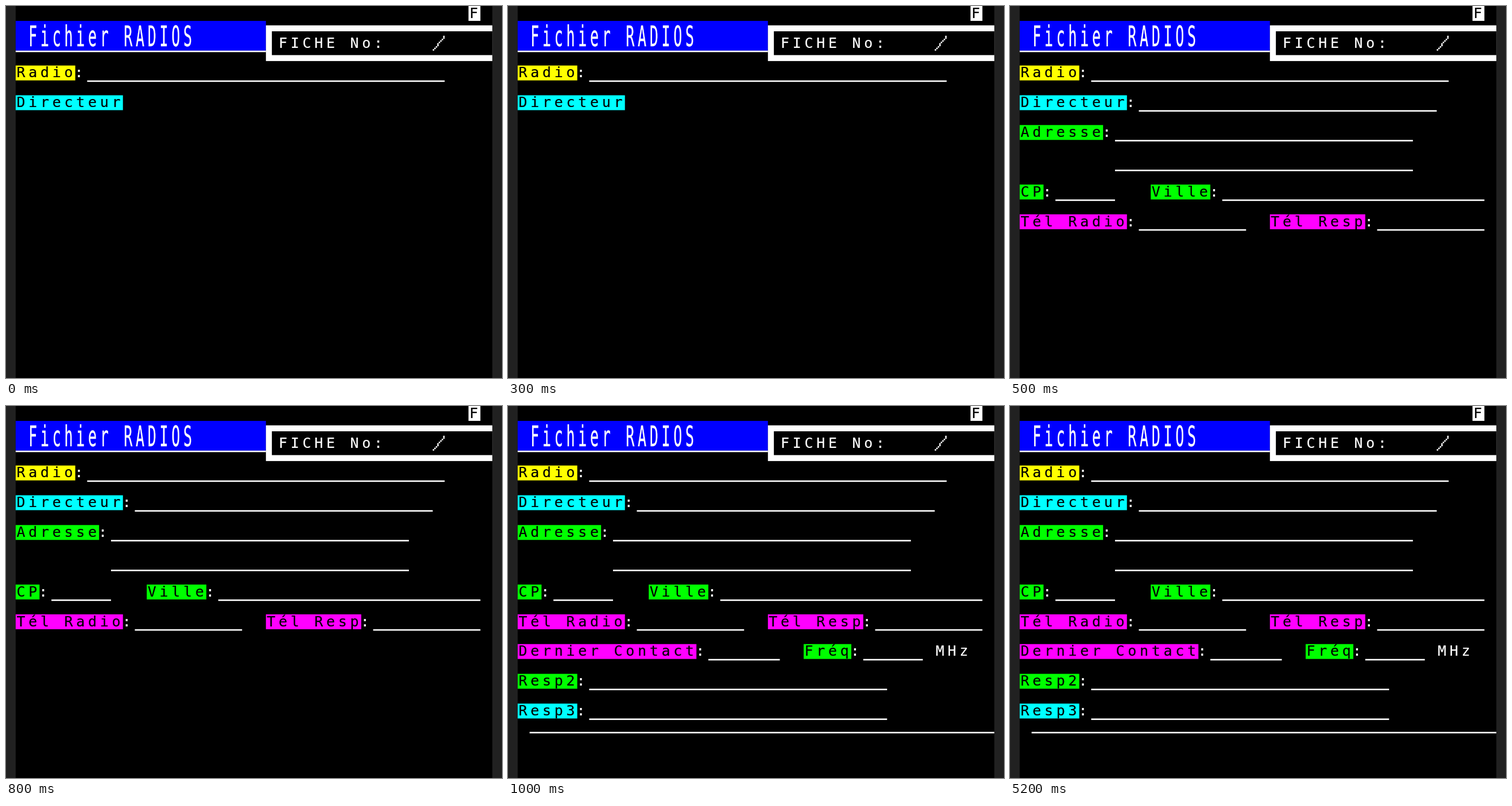
Animation of 864x648 px, one loop 8 s. Source, as an HTML page:

```html
<!DOCTYPE html>
<html lang="fr">
<head>
<meta charset="utf-8">
<style>
html, body { margin: 0; height: 100%; overflow: hidden; background: #212121; }
svg { display: block; width: 864px; height: 648px; }
text { font: 9.6px "DejaVu Sans Mono", monospace; stroke-width: .08; white-space: pre; }
</style>
</head>
<body>
<!-- 40 x 25 character cells of 8 x 10 dots -->
<svg viewBox="-6.5 0 333 250" preserveAspectRatio="none"></svg>
<script>
const NS = 'http://www.w3.org/2000/svg';
const YELLOW = '#ff0', CYAN = '#0ff', GREEN = '#0f0', MAGENTA = '#f0f', WHITE = '#fff', BLACK = '#000';
const svg = document.querySelector('svg');
let layer;

function add(name, attrs, parent = layer) {
  const el = document.createElementNS(NS, name);
  for (const key in attrs) el.setAttribute(key, attrs[key]);
  return parent.appendChild(el);
}

function rect(x, y, width, height, fill = WHITE) {
  add('rect', { x, y, width, height, fill });
}

// One glyph per cell; x and baseline are in dots
function text(str, x, baseline, color = WHITE, tall = 1) {
  const el = add('text', {
    transform: `translate(${x + 0.6} ${baseline}) scale(1 ${tall})`,
    x: [...str].map((_, i) => i * 8).join(' '),
    fill: color, stroke: color
  });
  el.textContent = str;
}

function label(str, col, row, color) {
  rect(col * 8, row * 10, str.length * 8, 10, color);
  text(str, col * 8, row * 10 + 8, BLACK);
}

function line(from, to, row) {
  rect(from * 8, row * 10 + 10, (to - from) * 8, 1);
}

function colon(col, row) {
  text(':', col * 8 - 1, row * 10 + 8);
}

function field(str, col, row, color, end) {
  const stop = col + str.length;
  label(str, col, row, color);
  colon(stop, row);
  line(stop + 1, end, row);
}

function stage(start, draw) {
  layer = add('g', {}, svg);
  draw();
  return { start, el: layer };
}

const stages = [
  stage(0, () => {
    rect(0, 0, 320, 250, BLACK);
    label('F', 38, 0, WHITE);
    rect(0, 10, 168, 20, '#00f');
    rect(0, 30, 168, 1);
    text('Fichier RADIOS', 8, 27, WHITE, 2);
    rect(168, 13, 152, 24);
    rect(172, 17, 148, 16, BLACK);
    text('FICHE No:', 176, 28);
    for (let i = 0; i < 10; i++) rect(287 - Math.floor(i * 0.8), 20 + i, 1, 1);
    field('Radio', 0, 4, YELLOW, 36);
    label('Directeur', 0, 6, CYAN);
  }),
  stage(500, () => {
    colon(9, 6);
    line(10, 35, 6);
    field('Adresse', 0, 8, GREEN, 33);
    line(8, 33, 10);
    field('CP', 0, 12, GREEN, 8);
    field('Ville', 11, 12, GREEN, 39);
    field('Tél Radio', 0, 14, MAGENTA, 19);
    field('Tél Resp', 21, 14, MAGENTA, 39);
  }),
  stage(1000, () => {
    field('Dernier Contact', 0, 16, MAGENTA, 22);
    field('Fréq', 24, 16, GREEN, 34);
    text('MHz', 280, 168);
    field('Resp2', 0, 18, GREEN, 31);
    field('Resp3', 0, 20, CYAN, 31);
    rect(8, 219, 312, 1);
  })
];

const origin = performance.now();

function frame() {
  const t = (performance.now() - origin) % 8000;
  for (const { start, el } of stages) el.style.display = t >= start ? '' : 'none';
  requestAnimationFrame(frame);
}
frame();
</script>
</body>
</html>
```
